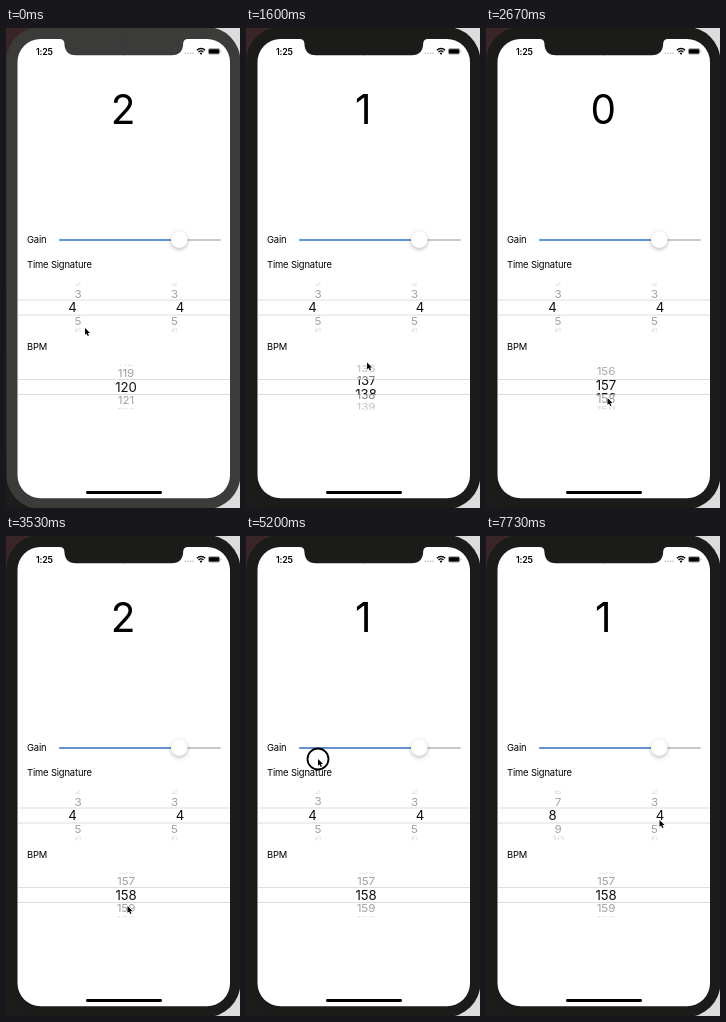
An HTML page with a canvas for the animation above (8 s loop, 234x480 px).

```html
<!DOCTYPE html>
<html lang="en">
<head>
<meta charset="utf-8">
<title>Metronome</title>
<style>
  html, body { margin: 0; width: 100%; height: 100%; overflow: hidden; background: #222; }
  canvas { display: block; width: 234px; height: 480px; }
</style>
</head>
<body>
<canvas id="stage"></canvas>
<script>
const LOOP = 8000, W = 234, H = 480;
const FONT = 'Inter, Roboto, sans-serif';
const canvas = document.getElementById('stage');
const ctx = canvas.getContext('2d');
const dpr = window.devicePixelRatio || 1;
canvas.width = W * dpr;
canvas.height = H * dpr;

const ACTIVE_AT = 1330;
const progress = (t, from, to) => Math.min(1, Math.max(0, (t - from) / (to - from)));
const smooth = p => p * p * (3 - 2 * p);
const easeOut = (p, power) => 1 - (1 - p) ** power;

// The count restarts when the tempo or the meter is changed.
function beat(t) {
  if (t < 2670) return (2 + Math.floor((t + 330) / 500)) % 4;
  return Math.floor(t < 7270 ? (t - 2670) / 425 : (t - 7270) / 400) % 4;
}

const tempo = t => 120 + 38 * easeOut(progress(t, 1200, 3130), 2.64);
const meter = t => 4 + 5 * easeOut(progress(t, 5200, 5800), 2) - smooth(progress(t, 6330, 6600));

// Pointer moves: start, end, x, y
const MOVES = [
  [0, 870, 123.5, 355.5], [1250, 1470, 121, 330], [1470, 2100, 121.5, 370],
  [3530, 4330, 69, 300], [5000, 5200, 72, 223], [5200, 5400, 77, 212],
  [6330, 6600, 76, 226], [6870, 7400, 169, 286], [7650, 7730, 173.5, 284]
];

function pointerAt(t) {
  let x = 79, y = 300;
  for (const [from, to, toX, toY] of MOVES) {
    const p = smooth(progress(t, from, to));
    x += (toX - x) * p;
    y += (toY - y) * p;
  }
  return [x, y];
}

const isPressed = t => (t > 1130 && t < 1470) || (t > 4930 && t < 6860);

function box(x, y, w, h, r, fill) {
  ctx.beginPath();
  ctx.roundRect(x, y, w, h, r);
  ctx.fillStyle = fill;
  ctx.fill();
}

function text(s, x, y, size, align = 'left', weight = 400, spacing = 0, color = '#000') {
  ctx.font = `${weight} ${size}px ${FONT}`;
  ctx.letterSpacing = spacing + 'px';
  ctx.textAlign = align;
  ctx.fillStyle = color;
  ctx.fillText(s, x, y);
}

const label = (s, y) => text(s, 21, y, 9.4, 'left', 400, -0.15);

function drawPhone(bezel) {
  const bg = ctx.createLinearGradient(0, 0, 0, H);
  bg.addColorStop(0, '#3a2529');
  bg.addColorStop(0.3, '#2a2526');
  bg.addColorStop(1, '#1c1c1c');
  ctx.fillStyle = bg;
  ctx.fillRect(0, 0, W, H);
  ctx.fillStyle = '#dcdcdc';
  ctx.fillRect(180, 0, 54, H);
  box(0.4, -1, 234, 482, 34, bezel);
  box(11.5, 11, 212.5, 459.3, 23, '#fff');

  // Notch: one half, then its mirror image
  ctx.fillStyle = bezel;
  for (const side of [-1, 1]) {
    ctx.save();
    ctx.translate(117.8, 0);
    ctx.scale(side, 1);
    ctx.beginPath();
    ctx.moveTo(-0.5, 10);
    ctx.lineTo(64, 10);
    ctx.lineTo(64, 11);
    ctx.quadraticCurveTo(59.6, 11, 59.4, 15.5);
    ctx.bezierCurveTo(59.2, 23, 55.5, 27.2, 48, 27.2);
    ctx.lineTo(-0.5, 27.2);
    ctx.fill();
    ctx.restore();
  }
  box(80, 463.1, 76, 2.8, 1.4, '#000');
}

function drawStatus() {
  text('1:25', 30, 26.5, 8.8, 'left', 600, -0.15);
  for (let i = 0; i < 4; i++) box(178.5 + i * 2.6, 24.6, 1.4, 1.4, 0.7, '#aaa');
  ctx.strokeStyle = '#000';
  ctx.lineWidth = 1.4;
  for (const r of [3.4, 5.8]) {
    ctx.beginPath();
    ctx.arc(195, 26.3, r, -Math.PI * 0.75, -Math.PI * 0.25);
    ctx.stroke();
  }
  ctx.fillStyle = '#000';
  ctx.beginPath();
  ctx.moveTo(195, 27);
  ctx.arc(195, 26.6, 1.9, -Math.PI * 0.75, -Math.PI * 0.25);
  ctx.fill();
  box(202, 20.3, 12, 6.2, 1.7, '#999');
  box(203, 21.2, 10, 4.4, 1, '#000');
  box(214.4, 22.4, 0.9, 2, 0.4, '#999');
}

function drawSlider() {
  box(53, 211.3, 162, 1.4, 0.7, '#b8b8ba');
  box(53, 211.3, 120, 1.4, 0.7, '#4482d2');
  ctx.save();
  ctx.shadowColor = 'rgba(0,0,0,.28)';
  ctx.shadowBlur = 4 * dpr;
  ctx.shadowOffsetY = 1.5 * dpr;
  box(165, 203.6, 16.4, 16.4, 8.2, '#fff');
  ctx.restore();
}

// Rows on a cylinder: grey outside the selection band, dark and larger inside.
function drawWheel(x, y, value, lean, reach) {
  const row = (n, inBand) => {
    const d = n - value, angle = d * 0.505;
    if (Math.abs(angle) > 1.4) return;
    ctx.save();
    ctx.translate(inBand ? x : x + lean, y + 28 * Math.sin(angle));
    if (inBand) ctx.scale(1, Math.cos(angle * 0.6));
    else {
      ctx.scale(0.88, 0.94 * Math.cos(angle));
      ctx.globalAlpha = Math.max(0, 0.65 - 0.25 * Math.abs(d));
    }
    text(n, 0, 4.7, 13.2, 'center', 400, -0.1, '#111');
    ctx.restore();
  };
  const part = (top, height, inBand) => {
    ctx.save();
    ctx.beginPath();
    ctx.rect(x - 40, top, 80, height);
    ctx.clip();
    const mid = Math.round(value);
    for (let n = mid - 3; n <= mid + 3; n++) row(n, inBand);
    ctx.restore();
  };
  part(y - reach, reach - 7.5, false);
  part(y + 7.5, reach - 7.5, false);
  part(y - 7.5, 15, true);
}

function drawBand(y) {
  ctx.fillStyle = '#dedede';
  ctx.fillRect(12, y - 8, 212, 1);
  ctx.fillRect(12, y + 7, 212, 1);
}

function drawPointer(t) {
  const [x, y] = pointerAt(t);
  if (isPressed(t)) {
    ctx.beginPath();
    ctx.arc(x, y, 10.5, 0, Math.PI * 2);
    ctx.lineWidth = 1.8;
    ctx.strokeStyle = '#000';
    ctx.stroke();
  }
  ctx.save();
  ctx.translate(x, y);
  ctx.scale(0.88, 0.88);
  const arrow = new Path2D('M0 0V7.8L1.8 6.2L3.1 9.2L4.5 8.6L3.2 5.7L5.7 5.6Z');
  ctx.lineJoin = 'round';
  ctx.lineWidth = 1.2;
  ctx.strokeStyle = '#fff';
  ctx.stroke(arrow);
  ctx.fillStyle = '#000';
  ctx.fill(arrow);
  ctx.restore();
}

function draw(t) {
  ctx.setTransform(dpr, 0, 0, dpr, 0, 0);
  drawPhone(t < ACTIVE_AT ? '#3b3b3a' : '#1b1b1a');
  drawStatus();
  text(beat(t), 117.2, 95.7, 40.5, 'center');
  label('Gain', 215.3);
  label('Time Signature', 239.8);
  label('BPM', 322.3);
  drawSlider();
  drawBand(279.5);
  drawBand(359);
  drawWheel(66.5, 279.3, meter(t), 5.5, 25);
  drawWheel(174, 279.3, 4, -5.5, 25);
  drawWheel(120, 359, tempo(t), 0, 22.5);
  drawPointer(t);
}

const start = performance.now();
function frame() {
  draw((performance.now() - start) % LOOP);
  requestAnimationFrame(frame);
}
frame();
</script>
</body>
</html>
```
